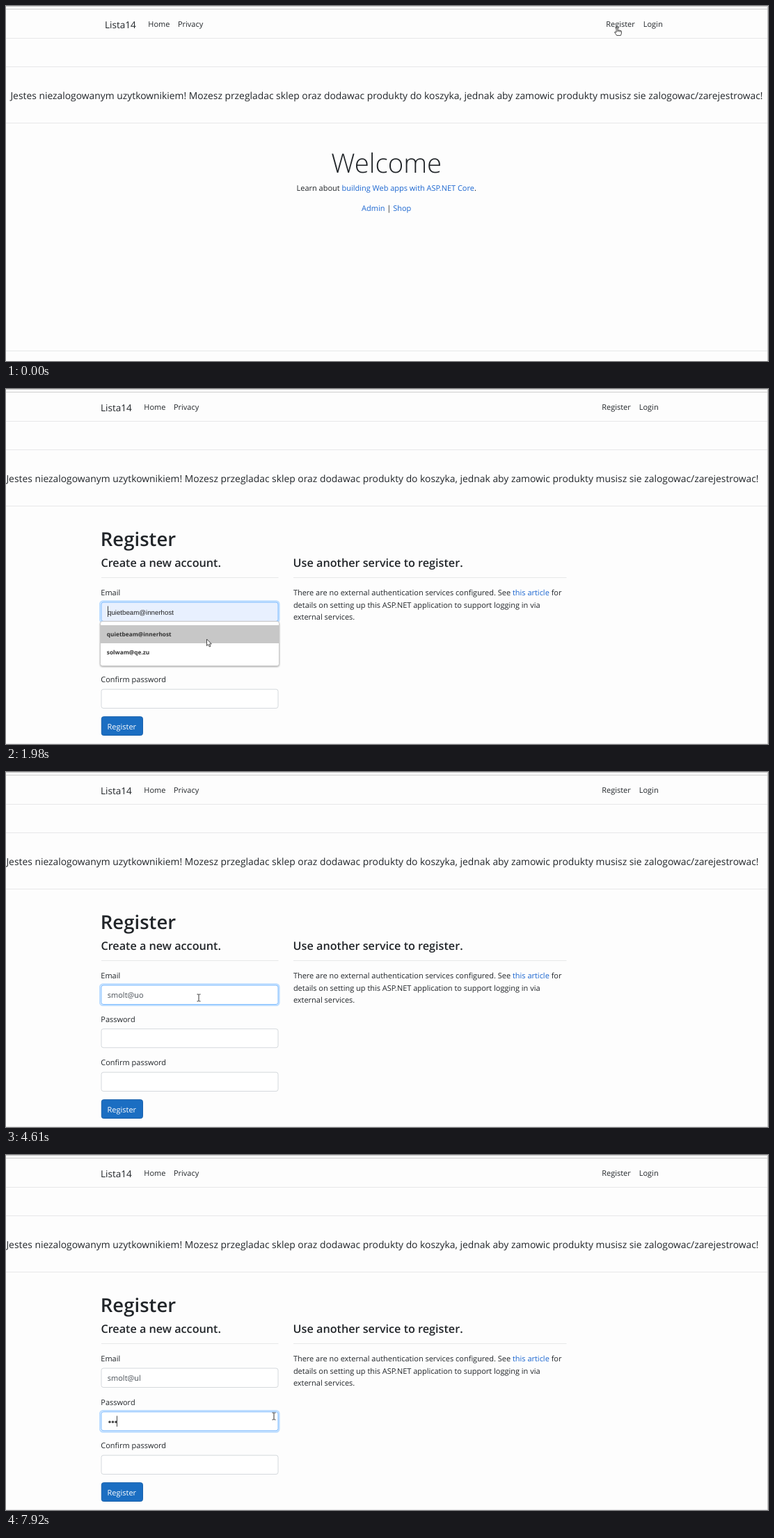
An HTML page for the animation above (8000 ms loop, 1095x511 px).

```html
<!DOCTYPE html>
<html lang="pl">
<head>
<meta charset="utf-8">
<title>Register</title>
<style>
html, body { margin: 0; width: 100%; height: 100%; overflow: hidden; background: #fdfdfd; }
svg { display: block; width: 1095px; height: 511px; }
text { font: 10.98px "Open Sans", "Noto Sans", sans-serif; fill: #212529; white-space: pre; text-rendering: geometricPrecision; }
.mid { text-anchor: middle; }
.link { fill: #1b66d0; }
.brand { font-size: 13.6px; }
.notice { font-size: 13.87px; }
.welcome { font-size: 38.4px; font-weight: 300; }
.h1 { font-size: 27.5px; font-weight: 600; }
.h4 { font-size: 16.2px; font-weight: 600; }
.value { fill: #495057; }
.fill { font: 9.7px "Liberation Sans", Arial, sans-serif; fill: #222; }
.item { font-size: 8.3px; font-weight: 700; fill: #333; }
.tab { font-size: 7.9px; font-weight: 700; }
.small { font-size: 8.2px; fill: #555; }
.rule { stroke: #e7e8e9; }
.box { fill: #fff; stroke: #d5d9dd; }
.focus { stroke: #80bdff; }
.ring { fill: none; stroke: #bfdeff; stroke-width: 2.4; }
.panel { fill: #fff; stroke: #c9c9c9; filter: drop-shadow(0 1px 1px #0005); }
.cursor { fill: #fff; stroke: #333; stroke-width: .9; stroke-linejoin: round; }
</style>
</head>
<body>
<svg viewBox="0 0 1095 511">
  <rect width="1095" height="511" fill="#fdfdfd"/>
  <path class="rule" d="M0 46.5H1094M0 87.5H1094M0 168.5H1094"/>
  <g id="header">
    <text class="brand" x="142" y="31.5">Lista14</text>
    <text x="204.3" y="30">Home</text>
    <text x="247" y="30">Privacy</text>
    <text x="862.3" y="30">Register</text>
    <text x="915.8" y="30">Login</text>
    <text class="notice mid" x="547" y="134.3">Jestes niezalogowanym uzytkownikiem! Mozesz przegladac sklep oraz dodawac produkty do koszyka, jednak aby zamowic produkty musisz sie zalogowac/zarejestrowac!</text>
  </g>

  <g id="home">
    <text class="welcome mid" x="546.7" y="239.5">Welcome</text>
    <text class="mid" x="546.7" y="266">Learn about <tspan class="link">building Web apps with ASP.NET Core</tspan>.</text>
    <text class="mid" x="546.7" y="295"><tspan class="link">Admin</tspan> | <tspan class="link">Shop</tspan></text>
    <path class="rule" d="M0 496.5H1094"/>
  </g>

  <g id="form">
    <path class="rule" d="M137 271.5H391.5M413 271.5H805.5M0 510.5H1094"/>
    <text class="h1" x="135.8" y="226.4">Register</text>
    <text class="h4" x="136.4" y="256">Create a new account.</text>
    <text class="h4" x="412.6" y="256">Use another service to register.</text>
    <text x="412.9" y="297">There are no external authentication services configured. See <tspan class="link">this article</tspan> for</text>
    <text x="412.9" y="314.5">details on setting up this ASP.NET application to support logging in via</text>
    <text x="412.9" y="332">external services.</text>
    <text x="136.3" y="297">Email</text>
    <text x="136.3" y="359.7">Password</text>
    <text x="136.3" y="422">Confirm password</text>
    <rect id="ring" class="ring" x="135.2" width="257.2" height="30.4" rx="4"/>
    <rect id="email" class="box" x="137" y="307" width="254" height="27.5" rx="3"/>
    <rect id="password" class="box" x="137" y="369.8" width="254" height="27" rx="3"/>
    <rect class="box" x="137" y="432.2" width="254" height="27.3" rx="3"/>
    <rect x="137.3" y="471.7" width="59.2" height="26.8" rx="3" fill="#1b6ec2" stroke="#1861ac"/>
    <text x="145.6" y="489.7" style="fill:#fff">Register</text>
    <text id="value" class="value" x="145.8" y="325.2"></text>
    <text id="preview" class="fill" x="146" y="325.3">quietbeam@innerhost</text>
    <g id="dots" fill="#444"><circle cx="149" cy="384.2" r="1.7"/><circle cx="153.5" cy="384.2" r="1.7"/><circle cx="158" cy="384.2" r="1.7"/></g>
    <rect id="caret" width="1" height="15.5" fill="#444"/>
    <g id="list">
      <rect id="panel" class="panel" x="135.5" y="334.5" width="257" rx="3"/>
      <rect id="hover" x="136" y="340" width="256.5" height="26" fill="#c7c7c7"/>
      <text id="first" class="item" x="144.8" y="356">quietbeam@innerhost</text>
      <text id="second" class="item" x="144.8">solwam@qe.zu</text>
    </g>
  </g>

  <g id="popup">
    <rect class="panel" x="811.5" y="4.5" width="235.5" height="65" rx="2"/>
    <text class="tab" x="837.6" y="21" style="fill:#1a73e8">angielski</text>
    <text class="tab" x="901" y="21" style="fill:#666">polski</text>
    <path d="M823.5 28.5H888" stroke="#1a73e8" stroke-width="1.5"/>
    <path d="M1006.8 14.5v.01m0 4v.01m0 4v.01" stroke="#555" stroke-width="1.9" stroke-linecap="round"/>
    <path d="M1026.5 15.5l6 6m0-6l-6 6" stroke="#555" stroke-width="1.2"/>
    <text class="small" x="823" y="56.3">Morvel Translate</text>
  </g>

  <path d="M0 .5H1094.5V511" fill="none" stroke="#c4c4c4"/>
  <path d="M0 4.5H1094" stroke="#cfcfcf"/>

  <g id="cursor">
    <path id="arrow" class="cursor" d="M0 0V9.6L2.2 7.6L3.8 11L5.4 10.3L3.9 7H6.8Z"/>
    <path id="hand" class="cursor" d="M-1 1Q0-.6 1 1V5Q2.2 4.1 3 5.2Q4.2 4.5 4.9 5.6Q6.4 5.2 6.4 6.8V9Q6.2 10.8 5.3 12.4H-.4Q-1.6 10.3-3.4 8Q-3.6 6.2-1 8ZM1 5V7.2M3 5.3V7.3M4.9 5.7V7.5"/>
    <path id="beam" d="M-2.5-5H-.6L0-4.4L.6-5H2.5M0-4.4V4.4M-2.5 5H-.6L0 4.4L.6 5H2.5" fill="none" stroke="#333"/>
  </g>
</svg>
<script>
const LOOP = 8000;
const el = Object.fromEntries([...document.querySelectorAll('[id]')].map(e => [e.id, e]));

// The screen refreshes only at these moments.
const ticks = [0, 640, 790, 910, 1030, 1180, 1300, 1450, 1600, 1720, 1850, 1980, 2100, 2250,
  2780, 2930, 3060, 3190, 3330, 3460, 3830, 4110, 4610, 4890, 5030, 5160, 5470, 5620,
  6150, 6300, 6420, 6560, 6690, 6830, 6970, 7110, 7650, 7790, 7920];

// Pointer path: time, x, y
const path = [[0, 878, 30], [639, 878, 30], [790, 851.5, 38], [1030, 690, 110], [1300, 300, 285],
  [1450, 195, 322], [1600, 183, 328], [1720, 190, 331], [1850, 245, 348], [1980, 288.5, 360],
  [2100, 284, 346], [2250, 277, 325], [6149, 277, 325], [6150, 343.5, 425], [6420, 362, 393],
  [6970, 385, 376], [LOOP, 385, 376]];

const typing = [[0, ''], [2780, 's'], [2930, 'sm'], [3060, 'smo'], [3190, 'smol'], [3330, 'smolt'],
  [3460, 'smolt@'], [3830, 'smolt@u'], [4110, 'smolt@uo'], [5030, 'smolt@u'], [5160, 'smolt@'],
  [5470, 'smolt@u'], [5620, 'smolt@ul']];

const show = (e, on) => e.style.display = on ? '' : 'none';
const set = (e, attrs) => { for (const k in attrs) e.setAttribute(k, attrs[k]); };
const between = (v, a, b) => v >= a && v < b;

function pointer(t) {
  const i = path.findIndex(p => p[0] > t);
  const [t0, x0, y0] = path[i - 1], [t1, x1, y1] = path[i];
  const k = (t - t0) / (t1 - t0);
  return [x0 + (x1 - x0) * k, y0 + (y1 - y0) * k];
}

function draw(now) {
  const t = ticks.findLast(s => s <= now % LOOP);
  const [x, y] = pointer(t);
  const home = t < 640;
  set(el.header, { transform: `translate(${home ? 0 : -6} 0)` });
  show(el.home, home);
  show(el.form, !home);
  el.popup.style.opacity = t === 790 ? .42 : between(t, 910, 1600) ? 1 : 0;

  const onEmail = between(t, 1600, 6690), onPassword = t >= 6690;
  el.email.classList.toggle('focus', onEmail);
  el.password.classList.toggle('focus', onPassword);
  show(el.ring, onEmail || onPassword);
  set(el.ring, { y: onPassword ? 368.1 : 305.5 });

  const hover = between(t, 1720, 2250) && between(y, 340, 366);
  show(el.hover, hover);
  show(el.preview, hover);
  el.email.style.fill = hover ? '#e8f0fe' : '';

  // One matching suggestion remains after the first key.
  const narrowed = t >= 2780;
  show(el.list, between(t, 1600, 2930));
  show(el.first, !narrowed);
  set(el.panel, { height: narrowed ? 38 : 64 });
  set(el.second, { y: narrowed ? 356 : 382.3 });

  const text = typing.findLast(s => s[0] <= t)[1];
  el.value.textContent = text;
  const dots = [7650, 7790, 7920].filter(s => s <= t).length;
  [...el.dots.children].forEach((d, i) => show(d, i < dots));
  const width = onPassword ? dots * 4.5 : text ? el.value.getComputedTextLength() : 0;
  show(el.caret, onPassword || onEmail && !between(t, 4610, 4890) && t < 6150);
  set(el.caret, { x: Math.round(145.8 + width), y: onPassword ? 375.5 : 312.5 });

  const inField = !home && between(x, 137, 391) &&
    (between(y, 307, 334) || between(y, 370, 397));
  set(el.cursor, { transform: `translate(${x} ${y})` });
  show(el.hand, home);
  show(el.beam, inField);
  show(el.arrow, !home && !inField);
}

const start = performance.now();
function loop() {
  draw(performance.now() - start);
  requestAnimationFrame(loop);
}
loop();
</script>
</body>
</html>
```
